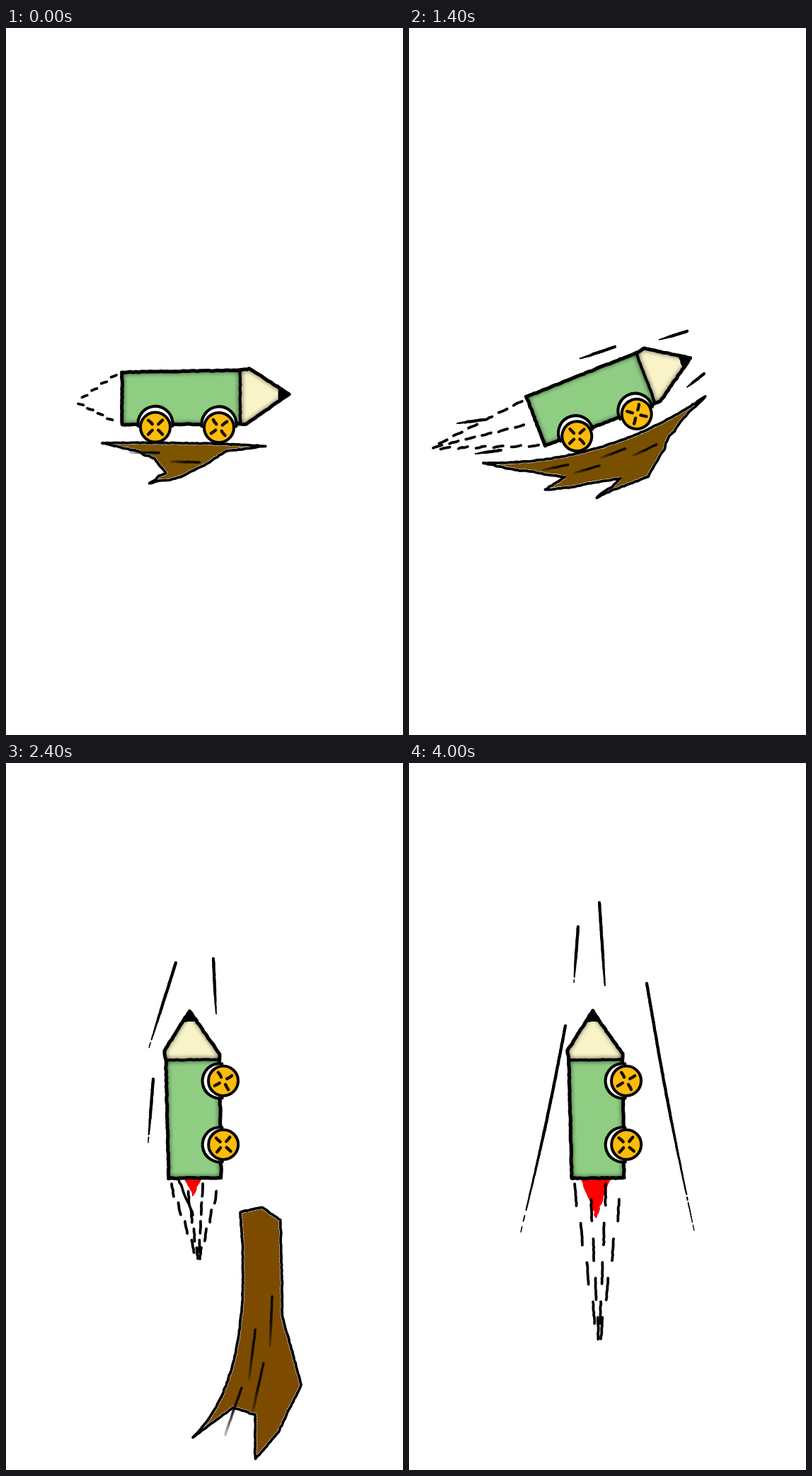
Write an HTML page with a canvas that moves like this. It is 561 px wide and 998 px high and loops after 4200 ms.

```html
<!DOCTYPE html>
<html lang="en">
<head>
<meta charset="utf-8">
<title>Pencil rocket</title>
<style>
html, body { margin: 0; width: 100%; height: 100%; overflow: hidden; background: #fff; }
canvas { display: block; width: 100vw; height: 100vh; }
</style>
</head>
<body>
<canvas id="stage" width="561" height="998"></canvas>
<script>
const ctx = document.getElementById('stage').getContext('2d');
const RAD = Math.PI / 180, STEP = 200;

let seed = 1;
const rand = () => {
  seed = (seed * 16807) % 2147483647;
  return seed / 2147483647;
};
const wobble = size => (rand() * 2 - 1) * size;
const mix = (a, b, k) => [a[0] + (b[0] - a[0]) * k, a[1] + (b[1] - a[1]) * k];
const pairs = list => list.flatMap((v, i) => i % 2 ? [] : [[v, list[i + 1]]]);

// Trembling hand-drawn line through points
function rough(pts, closed = false, size = 0.5) {
  const path = new Path2D();
  const ends = closed ? [...pts, pts[0]] : pts;
  path.moveTo(...pts[0]);
  for (let i = 1; i < ends.length; i++) {
    const [a, b] = [ends[i - 1], ends[i]];
    const steps = Math.max(1, Math.round(Math.hypot(b[0] - a[0], b[1] - a[1]) / 4));
    for (let s = 1; s <= steps; s++) {
      const [x, y] = mix(a, b, s / steps);
      path.lineTo(x + wobble(size), y + wobble(size));
    }
  }
  if (closed) path.closePath();
  return path;
}

function ink(path, width, color = '#000') {
  ctx.strokeStyle = color;
  ctx.lineWidth = width;
  ctx.stroke(path);
}

function fill(path, color) {
  ctx.fillStyle = color;
  ctx.fill(path);
}

// Speed line that thins out and crumbles toward its end
function drawStreak(a, b) {
  const steps = Math.ceil(Math.hypot(b[0] - a[0], b[1] - a[1]) / 4);
  const bend = steps > 50 ? 2.5 * Math.sign(a[0] - b[0]) : 0;
  const at = k => {
    const [x, y] = mix(a, b, k);
    return [x + bend * Math.sin(k * Math.PI), y];
  };
  for (let s = 0; s < steps; s++) {
    const k = s / steps;
    if (k > 0.85 && rand() < 0.4) continue;
    ink(rough([at(k), at((s + 1) / steps)], false, 0.3), 4.2 - 3 * Math.max(0, k - 0.5) * 2);
  }
}

// Ground: one quadratic curve above, ragged key points below
function drawGround({ curve, low, color, bite = 2.5, grain: [count, depth, size] }) {
  const [from, bend, to] = pairs(curve);
  const at = t => mix(mix(from, bend, t), mix(bend, to, t), t);
  const edge = Array.from({ length: 21 }, (_, i) => at(i / 20));
  let last = to;
  for (const key of pairs(low)) {
    edge.push(mix(last, key, 0.35), mix(last, key, 0.65).map(v => v + wobble(bite)), key);
    last = key;
  }
  const path = rough(edge, true);
  fill(path, color);
  ctx.setLineDash([1.2, 3]);
  ink(path, 5, '#fff');
  ctx.setLineDash([]);
  ink(path, 3.8);

  // Grain runs along the curve, alternating near and far
  for (let i = 0; i < count; i++) {
    const t = 0.35 + 0.5 * i / count;
    const p = at(t), q = at(t + 0.02);
    const len = Math.hypot(q[0] - p[0], q[1] - p[1]);
    const [ux, uy] = [(q[0] - p[0]) / len, (q[1] - p[1]) / len];
    const off = depth * (1 + 0.9 * (i % 2));
    const [x, y] = [p[0] - uy * off, p[1] + ux * off];
    const end = [x - ux * size, y - uy * size];
    const fade = ctx.createLinearGradient(x, y, ...end);
    fade.addColorStop(0.5, 'rgba(0,0,0,.85)');
    fade.addColorStop(1, 'rgba(0,0,0,.25)');
    ink(rough([[x, y], end], false, 0.3), 3.6, fade);
  }
}

// Pencil parts below share one frame: rear centre at 0,0, tip at 236,-6
const BODY = pairs([0, -37, 166, -40, 180, -42, 236, -6, 175, 36, 0, 37]);

function drawWheel(x, y, turn) {
  const arch = new Path2D();
  arch.arc(x, y - 5, 24.5, 172 * RAD, 368 * RAD);
  fill(arch, '#fff');
  ink(arch, 4.2);
  const disc = new Path2D();
  disc.arc(x, y, 21, 0, 7);
  fill(disc, '#fdbb0c');
  ink(disc, 4);
  for (let i = 0; i < 4; i++) {
    const a = (turn + i * 90) * RAD;
    const spoke = [6, 14].map(r => [x + r * Math.cos(a), y + r * Math.sin(a)]);
    ink(rough(spoke, false, 0.3), 4.4, '#1a1200');
  }
}

function drawBody() {
  const body = rough(BODY, true);
  ctx.save();
  ctx.clip(body);
  ctx.fillStyle = '#8fcd83';
  ctx.fillRect(-10, -50, 177, 100);
  ctx.fillStyle = '#f9f3c8';
  ctx.fillRect(167, -50, 80, 100);
  ctx.shadowColor = 'rgba(0,0,0,.8)';
  ctx.shadowBlur = 6;
  ink(body, 4);
  ink(rough([[167, -40], [167, 36]]), 4);
  ctx.restore();
  ink(body, 5);
  const lead = rough(pairs([222, -16, 236, -6, 222, 5]), true);
  fill(lead, '#000');
  ink(lead, 2.5);
}

function drawFlame(half, length) {
  const wedge = (w, len) => [[-2, -3 - w], [-len, -3], [-2, -3 + w]];
  if (half < 20) ink(rough(wedge(20, 52).slice(0, 2)), 3.6);
  const red = rough(wedge(half, length), true, 1.6);
  fill(red, '#f00');
  ink(red, 1.5, '#f00');
}

// Staggered dashes on rays from the rear edge to one far point
function drawSmoke(back, side, rays, count, share = 0.55) {
  const apex = [-back, side];
  for (let r = 0; r < rays; r++) {
    const start = [-8, -33 + 66 * r / (rays - 1)];
    const shift = r % 2 * 0.4;
    for (let i = 0; i < count; i++) {
      const k = (i + shift) / count;
      const a = mix(start, apex, k);
      const b = mix(start, apex, Math.min(1, k + share / count));
      ink(rough([a, [b[0], (a[1] + b[1]) / 2]]), 3.8);
    }
  }
}

function drawPencil({ pose: [x, y, turn], spin, smoke, flame }) {
  ctx.save();
  ctx.translate(x, y);
  ctx.rotate(turn * RAD);
  if (flame) drawFlame(...flame);
  drawSmoke(...smoke);
  drawBody();
  drawWheel(47, 40.5, spin[0] - turn);
  drawWheel(137, 41, spin[1] - turn);
  ctx.restore();
}

const puddle = {
  color: '#7d5400', grain: [2, 14, 40],
  curve: [136, 586, 250, 584, 367, 590],
  low: [312, 597, 274, 620, 240, 636, 203, 643, 226, 628, 210, 608, 188, 598]
};
const drip = {
  color: '#7d5400', grain: [0],
  curve: [150, 584, 250, 588, 374, 594],
  low: [288, 599, 264, 622, 268, 646, 238, 653, 252, 628, 213, 612, 208, 598]
};
const ramp = {
  color: '#785000', grain: [4, 13, 36],
  curve: [105, 614, 278, 617, 419, 520],
  low: [386, 553, 368, 576, 354, 605, 338, 633, 265, 663, 298, 636, 192, 652, 220, 634, 150, 624]
};
const slope = {
  color: '#755500', grain: [4, 14, 36],
  curve: [175, 630, 333, 540, 378, 398],
  low: [414, 440, 400, 490, 365, 560, 300, 608, 225, 638]
};
const cliff = {
  color: '#735a00', grain: [4, 12, 32],
  curve: [248, 666, 338, 543, 348, 408],
  low: [358, 450, 370, 490, 380, 550, 379, 593, 360, 573, 323, 628, 310, 612, 284, 649]
};
// Broken trunk stretched between two heights
function trunk(top, bottom) {
  const place = (v, i) => i % 2 ? top + (v - 627) * (bottom - top) / 355 : v;
  return {
    color: '#7d4b00', bite: 1, grain: [4, 22, 70 * Math.min(1, (bottom - top) / 355)],
    curve: [264, 952, 352, 868, 331, 634].map(place),
    low: [361, 627, 388, 645, 390, 780, 417, 878, 385, 945, 352, 982, 352, 920, 321, 910].map(place)
  };
}

const flyLines = [239, 231, 233, 310, 269, 197, 278, 333, 336, 311, 403, 660, 221, 371, 156, 670];
const flipped = flyLines.map((v, i) => i % 2 ? v - 28 : 560 - v);

const roll = { pose: [164, 523, 0], spin: [45, 53] };
const tilt = { pose: [179, 555, -20.7], spin: [10, 45], ground: ramp, smoke: [105, -5, 3, 4] };
const climb = {
  pose: [267, 586, -90.4], spin: [42, -30], smoke: [114, 4, 4, 4, 0.65], flame: [11, 24],
  lines: [240, 282, 202, 402, 293, 276, 297, 358, 208, 446, 201, 536]
};
const fly = { ...climb, smoke: [230, 0, 4, 4], flame: [20, 55], lines: flyLines };
const flyBack = { ...fly, smoke: [238, 0, 5, 4], lines: flipped };

const rollA = { ...roll, ground: puddle, smoke: [63, 5, 2, 4] };
const rollB = {
  ...roll, spin: [15, 5], ground: drip, smoke: [119, 11, 3, 6],
  lines: [448, 491, 355, 471, 428, 558, 390, 565]
};
const tiltFast = {
  ...tilt, spin: [45, 15], smoke: [150, -17, 3, 6],
  lines: [393, 428, 354, 440, 291, 450, 238, 468, 417, 488, 393, 507, 105, 553, 68, 558, 130, 596, 94, 601]
};
const steep = { pose: [200, 562, -55], spin: [20, 40], ground: slope, smoke: [135, -40, 3, 4, 0.75] };
const wall = {
  pose: [239.5, 582, -76.4], spin: [50, -10], ground: cliff,
  smoke: [144, -57, 3, 4, 0.75], flame: [12, 26]
};
const riseA = { ...climb, ground: trunk(362, 739), lines: [] };
const riseB = { ...climb, ground: trunk(335, 866) };
const riseC = { ...climb, ground: trunk(627, 982) };
const leave = { ...flyBack, ground: trunk(858, 973) };

// One scene per step
const order = [
  rollA, rollB, rollA, rollB, rollA, rollB, tilt, tiltFast, steep, wall,
  riseA, riseB, riseC, riseC, leave, flyBack, fly, flyBack, fly, flyBack, fly
];

function render(scene) {
  seed = 4711;
  ctx.fillStyle = '#fff';
  ctx.fillRect(0, 0, 561, 998);
  ctx.lineCap = ctx.lineJoin = 'round';
  if (scene.ground) drawGround(scene.ground);
  const ends = pairs(scene.lines || []);
  for (let i = 0; i < ends.length; i += 2) drawStreak(ends[i], ends[i + 1]);
  drawPencil(scene);
}

const start = performance.now();
let shown;
function tick() {
  const scene = order[Math.floor((performance.now() - start) / STEP) % order.length];
  if (scene !== shown) render(shown = scene);
  requestAnimationFrame(tick);
}
tick();
</script>
</body>
</html>
```
